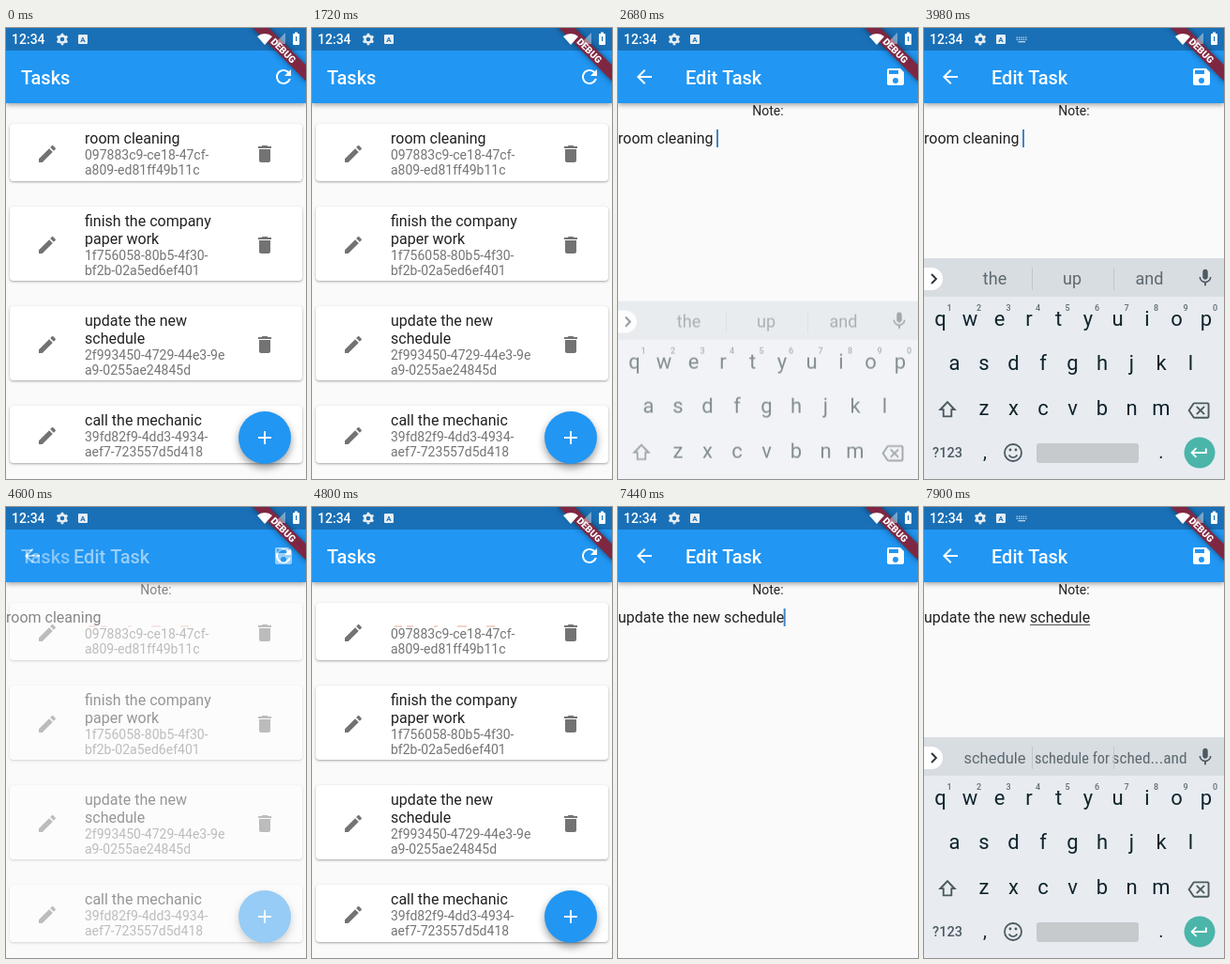
Write an HTML page with a canvas that moves like this. It is 320 px wide and 480 px high and loops after 8 s.

```html
<!DOCTYPE html>
<html lang="en">
<head>
<meta charset="utf-8">
<title>Tasks</title>
<style>
html, body { margin: 0; width: 100%; height: 100%; overflow: hidden; background: #fafafa; }
canvas { display: block; width: 320px; height: 480px; }
</style>
</head>
<body>
<canvas id="stage"></canvas>
<script>
const W = 320, H = 480, LOOP = 8000;
const BLUE = '#2196f3', NAVY = '#1a70b6', PAPER = '#fafafa', CARD = '#fff';
const INK = '#212121', MUTED = '#757575', GREY = '#737373';

const dpr = window.devicePixelRatio || 1;
const stage = document.getElementById('stage');
const sheet = document.createElement('canvas');
for (const c of [stage, sheet]) { c.width = W * dpr; c.height = H * dpr; }
const main = stage.getContext('2d'), off = sheet.getContext('2d');
let g = main;

const icons = {
  edit: 'M3 17.25V21h3.75L17.81 9.94l-3.75-3.75zM20.71 7.04c.39-.39.39-1.02 0-1.41l-2.34-2.34c-.39-.39-1.02-.39-1.41 0l-1.83 1.83 3.75 3.75z',
  trash: 'M6 19c0 1.1.9 2 2 2h8c1.1 0 2-.9 2-2V7H6zM19 4h-3.5l-1-1h-5l-1 1H5v2h14z',
  refresh: 'M17.65 6.35C16.2 4.9 14.21 4 12 4c-4.42 0-7.99 3.58-7.99 8s3.57 8 7.99 8c3.73 0 6.84-2.55 7.73-6h-2.08c-.82 2.33-3.04 4-5.65 4-3.31 0-6-2.69-6-6s2.69-6 6-6c1.66 0 3.14.69 4.22 1.78L13 11h7V4z',
  save: 'M17 3H5c-1.11 0-2 .9-2 2v14c0 1.1.89 2 2 2h14c1.1 0 2-.9 2-2V7zm-5 16a3 3 0 1 1 0-6 3 3 0 0 1 0 6zm3-10H5V5h10z',
  back: 'M20 11H7.83l5.59-5.59L12 4l-8 8 8 8 1.41-1.41L7.83 13H20z',
  plus: 'M19 13h-6v6h-2v-6H5v-2h6V5h2v6h6z',
  mic: 'M12 14c1.66 0 3-1.34 3-3V5c0-1.66-1.34-3-3-3S9 3.34 9 5v6c0 1.66 1.34 3 3 3zm5.3-3c0 3-2.54 5.1-5.3 5.1S6.7 14 6.7 11H5c0 3.41 2.72 6.23 6 6.72V21h2v-3.28c3.28-.48 6-3.3 6-6.72z',
  erase: 'M22 3H7c-.69 0-1.23.35-1.59.88L0 12l5.41 8.11c.36.53.9.89 1.59.89h15c1.1 0 2-.9 2-2V5c0-1.1-.9-2-2-2zm0 16H7.07L2.4 12l4.66-7H22zm-11.59-2L14 13.41 17.59 17 19 15.59 15.41 12 19 8.41 17.59 7 14 10.59 10.41 7 9 8.41 12.59 12 9 15.59z',
  enter: 'M19 7v4H5.83l3.58-3.59L8 6l-6 6 6 6 1.41-1.41L5.83 13H21V7z',
  shift: 'M12 3L2.5 13H7v7h10v-7h4.5zm0 2.8L17 11.2h-1.8v7H8.8v-7H7z'
};
for (const k in icons) icons[k] = new Path2D(icons[k]);

const tasks = [
  { y: 102, h: 61, title: ['room cleaning'], id: ['097883c9-ce18-47cf-', 'a809-ed81ff49b11c'] },
  { y: 190, h: 79, title: ['finish the company', 'paper work'], id: ['1f756058-80b5-4f30-', 'bf2b-02a5ed6ef401'] },
  { y: 296, h: 79, title: ['update the new', 'schedule'], id: ['2f993450-4729-44e3-9e', 'a9-0255ae24845d'] },
  { y: 402, h: 61, title: ['call the mechanic'], id: ['39fd82f9-4dd3-4934-', 'aef7-723557d5d418'] }
];

const clamp = v => Math.max(0, Math.min(1, v));
const part = (t, a, b) => clamp((t - a) / (b - a));
const easeOut = p => 1 - (1 - p) ** 3;
const easeInOut = p => p * p * (3 - 2 * p);
const within = (t, a, b) => t >= a && t < b;

function rect(x, y, w, h, color, r = 0) {
  g.fillStyle = color;
  g.beginPath();
  g.roundRect(x, y, w, h, r);
  g.fill();
}
function disc(x, y, r, color) {
  g.fillStyle = color;
  g.beginPath();
  g.arc(x, y, r, 0, 7);
  g.fill();
}
function text(s, x, y, size, color, align = 'left', weight = 400, family = 'Roboto') {
  g.font = `${weight} ${size}px ${family}, sans-serif`;
  g.textAlign = align;
  g.fillStyle = color;
  g.fillText(s, x, y);
}
function icon(name, x, y, color, size = 24) {
  const k = size / 24;
  g.save();
  g.translate(x - size / 2, y - size / 2);
  g.scale(k, k);
  g.fillStyle = color;
  g.fill(icons[name], 'evenodd');
  g.restore();
}
function shadow(blur, dy, alpha) {
  g.shadowColor = `rgba(0,0,0,${alpha})`;
  g.shadowBlur = blur * dpr;
  g.shadowOffsetY = dy * dpr;
}
function ripple(x, y, p) {
  if (p > 0 && p < 1) disc(x, y, 10 + 14 * easeOut(p), `rgba(110,110,110,${0.25 * (1 - p * p)})`);
}
// Paint a group apart so that it fades as one
function layer(alpha, dy, paint) {
  if (alpha <= 0) return;
  off.setTransform(dpr, 0, 0, dpr, 0, 0);
  off.clearRect(0, 0, W, H);
  g = off;
  paint();
  g = main;
  g.save();
  g.globalAlpha = alpha;
  g.drawImage(sheet, 0, dy, W, H);
  g.restore();
}

function appBar(title, x, action) {
  g.save();
  shadow(5, 2, 0.35);
  rect(0, 0, W, 80, BLUE);
  g.restore();
  rect(0, 0, W, 24, NAVY);
  text(title, x, 60, 20, '#fff', 'left', 500);
  icon(action, 296, 52, '#fff');
}

function card(task, blank) {
  const { y, h } = task;
  g.save();
  shadow(2.5, 1, 0.35);
  rect(4, y, 312, h, CARD, 4);
  g.restore();
  const mid = y + h / 2 + 1.5;
  icon('edit', 44, mid, GREY);
  icon('trash', 276, mid, GREY);
  if (blank) {
    for (const [x, w] of [[88, 8], [101, 7], [130, 4], [155, 10], [186, 9]]) rect(x, y + 24.5, w, 1, '#e8a890');
  } else {
    task.title.forEach((s, i) => text(s, 84, y + 20.5 + 19 * i, 16, INK));
  }
  const top = y + 18.5 + 19 * task.title.length;
  task.id.forEach((s, i) => text(s, 84, top + 16.4 * i, 14, MUTED));
}

function listPage(t) {
  rect(0, 0, W, H, PAPER);
  const scroll = 80 * (easeOut(part(t, 40, 800)) - easeOut(part(t, 880, 1550)));
  g.save();
  g.translate(0, -scroll);
  tasks.forEach((task, i) => card(task, i === 0 && within(t, 4220, 6770)));
  ripple(44, 134, part(t, 2010, 2400));
  ripple(44, 337, part(t, 6880, 7080));
  g.restore();
  appBar('Tasks', 16, 'refresh');
  g.save();
  shadow(8, 4, 0.4);
  disc(276, 436, 28, BLUE);
  g.restore();
  icon('plus', 276, 436, '#fff');
}

function editPage(t, second) {
  rect(0, 0, W, H, PAPER);
  appBar('Edit Task', 72, 'save');
  icon('back', 28, 52, '#fff');
  ripple(296, 52, part(t, 4220, 4480));
  text('Note:', 160, 93, 14, INK, 'center');
  const note = second ? 'update the new schedule' : 'room cleaning ';
  text(note, 0, 123, 16, INK);
  const end = g.measureText(note).width;
  if (within(t, 2680, 3060) || within(t, 3980, 4400) || within(t, 7440, 7690))
    rect(end - 0.5, 108, 2, 19, '#4285c4');
  if (t >= 7770) {
    const from = g.measureText('update the new ').width;
    rect(from, 125, end - from, 1, '#555');
  }
}

function keyRow(keys, x, y, hints) {
  [...keys].forEach((c, i) => {
    const mid = x + 31.5 * i;
    text(c, mid, y, 22, '#10242c', 'center');
    if (hints) text((i + 1) % 10, mid + 9.5, 301, 9, '#5f6c73', 'center', 500);
  });
}

// Suggestions use the condensed face and shrink to their slot when long
function suggestion(s, x) {
  const room = 80, long = s.length > 8;
  const family = long ? '"Roboto Condensed", Roboto' : 'Roboto';
  g.font = `18px ${family}, sans-serif`;
  const size = Math.min(18, 18 * room / g.measureText(s).width, s.length > 3 && !long ? 16.5 : 18);
  text(s, x, 267 + size * 0.34, size, '#5c686f', 'center', 400, family);
}

function keyboard(second) {
  const dim = '#4c5a62';
  rect(0, 245, W, 235, '#e8ecf1');
  rect(0, 245, W, 41, '#d8dde2');
  rect(-12, 255, 32, 24, '#fff', 12);
  g.strokeStyle = '#263238';
  g.lineWidth = 1.8;
  g.beginPath();
  g.moveTo(8, 262);
  g.lineTo(13, 267);
  g.lineTo(8, 272);
  g.stroke();
  const words = second ? ['schedule', 'schedule for', 'sched...and'] : ['the', 'up', 'and'];
  words.forEach((s, i) => suggestion(s, 75.5 + 82.5 * i));
  rect(115, 255, 1, 24, '#c0c7cc');
  rect(202, 255, 1, 24, '#c0c7cc');
  icon('mic', 300, 266, dim, 22);

  keyRow('qwertyuiop', 17.5, 317, true);
  keyRow('asdfghjkl', 32.5, 364);
  keyRow('zxcvbnm', 64, 412);
  icon('shift', 25, 406, dim, 25);
  icon('erase', 293, 407, dim, 23);

  text('?123', 25, 457, 14.5, dim, 'center', 500);
  text(',', 65, 458, 20, '#10242c', 'center');
  text('.', 253, 458, 20, '#10242c', 'center');
  g.strokeStyle = dim;
  g.lineWidth = 1.8;
  g.beginPath();
  g.arc(95, 452, 9, 0, 7);
  g.stroke();
  g.beginPath();
  g.arc(95, 452.5, 4.6, 0.4, Math.PI - 0.4);
  g.stroke();
  disc(92, 449, 1.4, dim);
  disc(98, 449, 1.4, dim);
  rect(120, 442, 109, 21, '#c6cacd', 3);
  disc(294, 452, 16.5, '#4bb5a9');
  icon('enter', 293.5, 452, '#fff', 22);
}

function statusBar(typing) {
  const pale = '#e6eef4';
  text('12:34', 6, 17, 14, '#fff', 'left', 500);
  g.strokeStyle = pale;
  g.lineWidth = 2.6;
  g.beginPath();
  g.arc(60, 12, 3.6, 0, 7);
  for (let i = 0; i < 6; i++) {
    const a = i * Math.PI / 3 + Math.PI / 6, c = Math.cos(a), s = Math.sin(a);
    g.moveTo(60 + 4 * c, 12 + 4 * s);
    g.lineTo(60 + 6.3 * c, 12 + 6.3 * s);
  }
  g.stroke();
  rect(77, 7, 10, 10, pale, 1);
  text('A', 82, 15, 8, NAVY, 'center', 700);
  if (typing) {
    for (let i = 0; i < 10; i++) rect(98.5 + 2.4 * (i % 5), 9.5 + 2.2 * Math.floor(i / 5), 1.4, 1.3, '#c3d7e6');
    rect(100.5, 14, 7.5, 1.3, '#c3d7e6');
  }
  g.fillStyle = '#fff';
  g.beginPath();
  g.moveTo(276, 18);
  g.arc(276, 18, 12, -2.3, -0.84);
  g.fill();
  g.fillStyle = 'rgba(255,255,255,.4)';
  g.beginPath();
  g.moveTo(286, 17);
  g.lineTo(298, 17);
  g.lineTo(298, 5);
  g.fill();
  rect(306, 6, 7, 12, '#fff', 1);
  rect(308, 4.5, 3, 2, '#fff');
  rect(309, 9, 1.2, 5, NAVY);
}

function banner() {
  g.save();
  g.translate(W, 0);
  g.rotate(Math.PI / 4);
  g.save();
  shadow(6, 0, 0.5);
  rect(-42, 28, 84, 12, '#7f2742');
  g.restore();
  text('DEBUG', 0, 37.7, 10.2, '#fff', 'center', 900);
  g.restore();
}

// How far the edit page is in, how far the keyboard is up
const pageIn = t => t < 4220 ? part(t, 2160, 2500) : t < 6770 ? 1 - part(t, 4440, 4780) : part(t, 6880, 7110);
function keysIn(t) {
  if (t < 4220) return t < 2680 ? 0 : 0.5 + 0.5 * easeOut(part(t, 2680, 3000));
  if (t < 6770) return 1 - part(t, 4240, 4440);
  return t < 7690 ? 0 : 0.5 + 0.5 * easeOut(part(t, 7690, 7890));
}

function draw(t) {
  main.setTransform(dpr, 0, 0, dpr, 0, 0);
  const second = t > 6770, page = pageIn(t), keys = keysIn(t);
  if (page < 1) listPage(t);
  layer(easeInOut(page), 0, () => editPage(t, second));
  layer(keys, 92 * (1 - keys), () => keyboard(second));
  banner();
  statusBar(within(t, 2850, 4400) || t >= 7810);
}

const start = performance.now();
function tick() {
  draw((performance.now() - start) % LOOP);
  requestAnimationFrame(tick);
}
tick();
</script>
</body>
</html>
```
